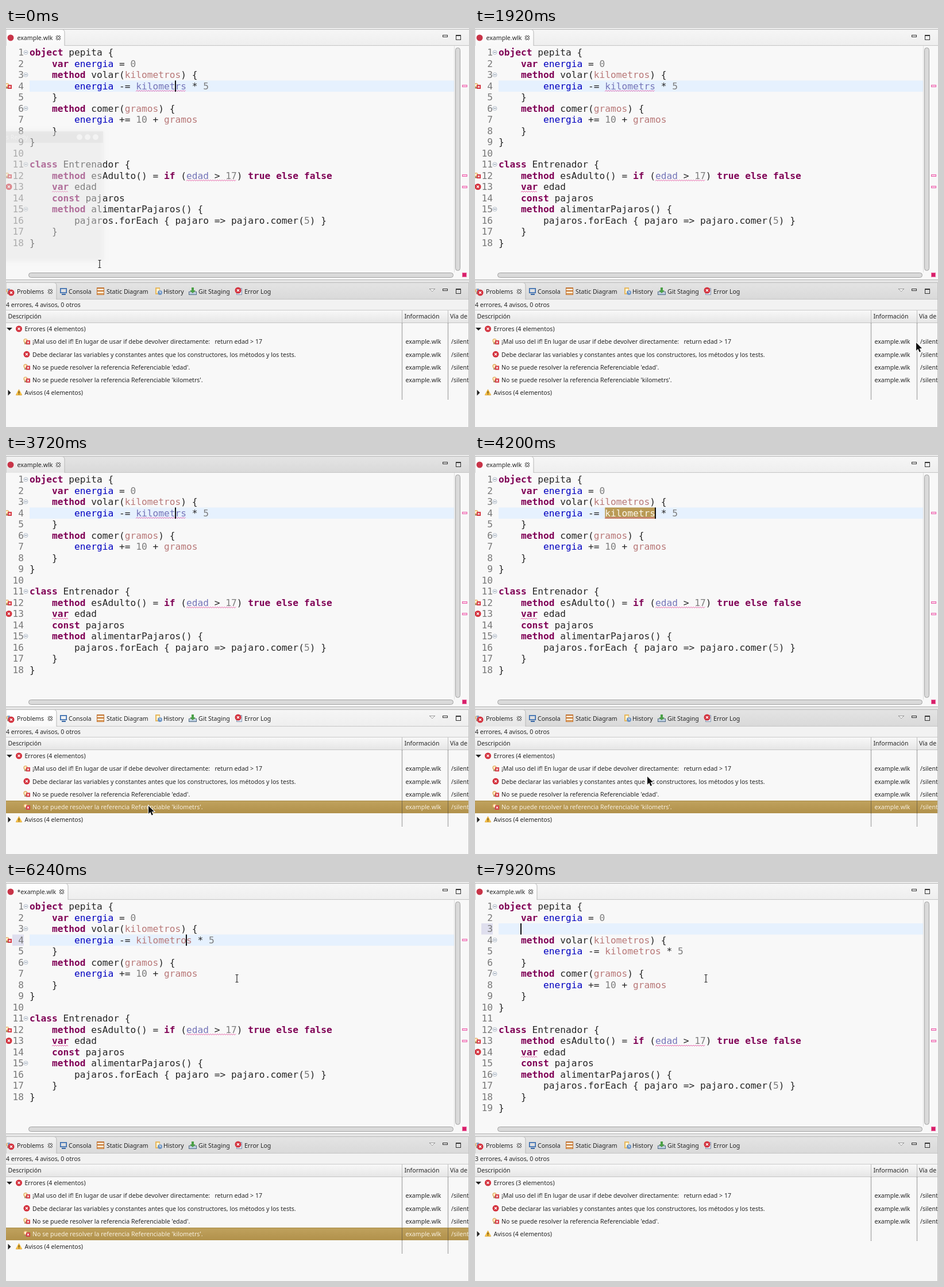
Write an HTML page with a canvas that moves like this. It is 806 px wide and 695 px high and loops after 8 s.

```html
<!DOCTYPE html>
<html lang="es">
<head>
<meta charset="utf-8">
<title>Editor</title>
<style>
html, body { margin: 0; width: 806px; height: 695px; overflow: hidden; background: #f8f8f8; }
canvas { display: block; }
</style>
</head>
<body>
<canvas id="stage" width="806" height="695"></canvas>
<script>
const g = document.getElementById('stage').getContext('2d');
const LOOP = 8000, LEFT = 41, TOP = 33, LINE = 19.5, CHAR = 9.753;
const UI = '10.57px "Noto Sans", sans-serif';
const MONO = '16.2px "DejaVu Sans Mono", monospace';
const RED = '#d3303c', INK = '#252525';

const CODE = `object pepita {
    var energia = 0
    method volar(kilometros) {
        energia -= kilometrs * 5
    }
    method comer(gramos) {
        energia += 10 + gramos
    }
}

class Entrenador {
    method esAdulto() = if (edad > 17) true else false
    var edad
    const pajaros
    method alimentarPajaros() {
        pajaros.forEach { pajaro => pajaro.comer(5) }
    }
}`;

// time, x, y of the pointer
const POINTER = [
  [0, 163, 411], [480, 420, 430], [600, 719, 560], [720, 480, 600], [840, 187, 617],
  [1560, 70, 575], [1680, 2, 548], [1800, 330, 546], [1920, 768, 548], [2040, 560, 552],
  [2160, 230, 566], [2280, 80, 570], [2400, 300, 568], [2520, 738, 568], [2640, 420, 572],
  [2760, 59, 572], [2880, 130, 596], [3000, 150, 633], [3120, 240, 619], [3240, 245, 614],
  [3360, 248, 611], [4200, 300, 560], [4320, 420, 400], [4440, 492, 220], [4560, 380, 71],
  [4680, 71, 110], [4800, 220, 100], [4920, 318, 104], [5040, 314, 105], [5160, 310, 105],
  [5280, 308, 104], [5640, 350, 130], [5760, 402, 168]
];

// time, line, column, visible
const CARET = [
  [0, 4, 26, 1], [600, 4, 26, 0], [1080, 4, 26, 1], [1560, 4, 26, 0], [2160, 4, 26, 1],
  [2640, 4, 26, 0], [3240, 4, 26, 1], [3960, 4, 28, 1], [4560, 4, 28, 0], [5040, 4, 28, 1],
  [5520, 4, 27, 1], [6120, 4, 28, 1], [6840, 4, 28, 0], [7200, 3, 28, 1], [7440, 2, 19, 1],
  [7800, 3, 4, 1]
];

const at = (keys, t) => keys.filter(k => k[0] <= t).pop();
const lineTop = n => TOP + (n - 1) * LINE;
const colX = c => LEFT + c * CHAR;

function box(x, y, w, h, fill) { g.fillStyle = fill; g.fillRect(x, y, w, h); }

function frame(x, y, w, h, stroke) {
  g.strokeStyle = stroke;
  g.lineWidth = 1;
  g.strokeRect(x + .5, y + .5, w - 1, h - 1);
}

function text(s, x, y, color = INK, font = UI) {
  g.font = font;
  g.fillStyle = color;
  g.fillText(s, x, y);
}

function path(points, fill, stroke, width = 1, close = true) {
  g.beginPath();
  points.forEach(([x, y]) => g.lineTo(x, y));
  if (close) g.closePath();
  if (stroke) { g.strokeStyle = stroke; g.lineWidth = width; g.stroke(); }
  if (fill) { g.fillStyle = fill; g.fill(); }
}

function disc(x, y, r, fill) {
  g.beginPath();
  g.arc(x, y, r, 0, 7);
  g.fillStyle = fill;
  g.fill();
}

function fade(y, h, from, to) {
  const f = g.createLinearGradient(0, y, 0, y + h);
  f.addColorStop(0, from);
  f.addColorStop(1, to);
  return f;
}

function cross(x, y, r, color, width = 1.3) {
  path([[x - r, y - r], [x + r, y + r]], null, color, width, false);
  path([[x + r, y - r], [x - r, y + r]], null, color, width, false);
}

function errorIcon(x, y) {
  disc(x, y, 5.5, RED);
  cross(x, y, 2, '#fff');
}

function fixIcon(x, y) {
  disc(x - 2, y - 1.5, 3.6, '#e3ac63');
  disc(x - 2, y - 1.5, 2.3, '#fff0c8');
  box(x - 4, y + 2, 4, 2.5, '#a98960');
  box(x - 1, y - 2, 7, 7, RED);
  cross(x + 2.5, y + 1.5, 1.7, '#fff', 1.1);
}

function warningIcon(x, y) {
  path([[x, y - 5], [x + 5, y + 4.5], [x - 5, y + 4.5]], '#f5c044', '#d99a28');
  box(x - .7, y - 2, 1.5, 3.5, '#513b10');
  box(x - .7, y + 2.2, 1.5, 1.3, '#513b10');
}

function closeIcon(x, y) {
  cross(x, y, 3.2, '#444', 3.6);
  cross(x, y, 3, '#f8f8f8', 1.6);
}

function squiggle(from, to, line) {
  const y = lineTop(line) + 18, points = [];
  for (let x = colX(from), i = 0; x <= colX(to); x += 2, i++) points.push([x, y + (i % 2 ? -1 : 1)]);
  path(points, null, '#e65aa4', 1, false);
}

function thumb(x, y, w, h) {
  g.beginPath();
  g.roundRect(x + .5, y + .5, w - 1, h - 1, 4);
  g.fillStyle = '#dadada';
  g.fill();
  g.strokeStyle = '#a2a2a2';
  g.lineWidth = 1;
  g.stroke();
}

function tab(right, top, bottom, active) {
  g.beginPath();
  g.moveTo(0, bottom);
  g.lineTo(0, top + .5);
  g.lineTo(right - 5, top + .5);
  g.quadraticCurveTo(right, top + .5, right, top + 6);
  g.lineTo(right, bottom);
  g.fillStyle = active ? fade(top, bottom - top, '#ffffff', '#f8f8f8') : fade(top, bottom - top, '#f3f3f3', '#e5e5e5');
  g.fill();
  g.strokeStyle = '#b7b7b7';
  g.lineWidth = 1;
  g.stroke();
}

function windowButtons(y) {
  frame(760, y, 9, 4, '#333');
  frame(783, y, 9, 9, '#333');
  box(783, y, 9, 2, '#333');
}

function bar(top, h, active) {
  box(0, top, 806, h, active ? fade(top, h, '#f6f6f6', '#eeeeee') : fade(top, h, '#e4e4e4', '#d9d9d9'));
  box(0, top, 806, 1, '#b7b7b7');
  box(0, top + h - 1, 806, 1, '#c5c5c5');
}

function codeLine(src, n) {
  const y = lineTop(n) + 15.2;
  const token = /\b(object|var|method|class|const|if|true|else|false)\b|\b(energia)\b|\b(kilometros|gramos)\b|\b(kilometrs)\b|\b(\d+)\b|[^\s\w]+|\w+/g;
  for (const m of src.matchAll(token)) {
    const [s, keyword, field, param, unknown, number] = m;
    const unresolved = unknown || (s === 'edad' && src.includes('if'));
    const color = keyword ? '#7f0055' : field ? '#0000c0' : param ? '#b87878'
      : unresolved ? '#7474b8' : number ? '#7d7d7d' : INK;
    text(s, colX(m.index), y, color, (keyword ? 'bold ' : '') + MONO);
  }
}

function editor(s) {
  bar(2, 29, s.editorActive);
  const shift = s.dirty ? 6 : 0;
  tab(102 + shift, 2, 31, s.editorActive);
  disc(8, 17, 5.5, '#c83448');
  text((s.dirty ? '*' : '') + 'example.wlk', 19.5, 21);
  closeIcon(91 + shift, 17);
  windowButtons(12);
  box(0, 31, 806, 407, '#f8f8f8');

  const lines = CODE.split('\n');
  if (s.typed) lines[3] = lines[3].replace('kilometrs', 'kilometros');
  if (s.inserted) lines.splice(2, 0, '');
  const [, caretLine, caretCol, caretOn] = s.caret;
  const mark = lineTop(caretLine);
  box(LEFT, mark, 739, LINE, '#e6f1fe');
  if (s.dirty) box(11, mark, 20, LINE, '#dfdfee');

  lines.forEach((src, i) => {
    const n = i + 1, mid = lineTop(n) + 9.5;
    g.textAlign = 'right';
    text(n, 31, lineTop(n) + 15.2, '#787878', MONO);
    g.textAlign = 'left';
    if (/^(object|class)|method (volar|comer|alim)/.test(src.trim())) {
      g.beginPath();
      g.arc(34.5, mid, 3.5, 0, 7);
      g.strokeStyle = '#b0bccb';
      g.lineWidth = 1;
      g.stroke();
      box(32.5, mid - .5, 4, 1, '#6f8299');
    }
    codeLine(src, n);
    if (src.includes('kilometrs')) squiggle(19, 28, n);
    if (src.includes(' if ')) { squiggle(28, 37, n); fixIcon(4, mid); }
    if (src.endsWith('var edad')) { squiggle(4, 7, n); errorIcon(5, mid); }
  });

  if (s.selected) {
    box(colX(19), lineTop(4), 9 * CHAR, LINE, '#b99a55');
    text('kilometrs', colX(19), lineTop(4) + 15.2, '#faf6ec', MONO);
    squiggle(19, 28, 4);
  }
  if (!s.saved) fixIcon(4, lineTop(4) + 9.5);
  if (s.bracket) frame(Math.round(colX(16)), lineTop(3) + 1, 10, 18, '#b8b8b8');
  if (caretOn) box(Math.round(colX(caretCol)) - 1, mark, 2, LINE, '#111');

  box(780, 31, 1, 395, '#dedede');
  thumb(782, 34, 9, 389);
  thumb(39, 426, 740, 9);
  for (const y of s.saved ? [257, 277] : [101, 257, 277]) {
    box(794, y - 2, 9, 4, '#ffd2e9');
    frame(794, y - 2, 9, 4, '#e960ab');
  }
  box(794, 426, 8, 8, '#d61f69');
  frame(794, 426, 8, 8, '#f06da4');
  box(0, 438, 806, 1, '#b5b5b5');
  box(0, 439, 806, 4, '#e6e6e6');
}

function tabIcons() {
  fixIcon(6, 459);
  box(3, 454, 4, 9, '#7f9fca');
  errorIcon(9, 461);

  frame(94, 453, 12, 9, '#3465a4');
  frame(95, 454, 10, 7, '#6b95cb');
  box(97, 463, 7, 2, '#3465a4');

  box(158, 452, 13, 13, '#c06f2d');
  for (const y of [454, 459]) box(159, y, 11, 3, '#fff0d5');
  box(159, 463, 11, 1, '#f3c78e');

  box(260, 452, 8, 12, '#e6b75d');
  box(262, 454, 5, 8, '#fff4d2');
  disc(268, 461, 4, '#6f96c5');
  path([[268, 458], [268, 461], [270, 461]], null, '#fff', 1, false);

  frame(318, 459, 14, 6, '#506b86');
  box(319, 461, 12, 3, '#b8cade');
  path([[323, 452], [327, 452], [327, 457], [330, 457], [325, 462], [320, 457], [323, 457]], '#4ba047');

  box(401, 453, 10, 12, '#dce5f1');
  frame(401, 453, 10, 12, '#8799b2');
  errorIcon(404, 457);
}

function problems(s) {
  bar(443, 30, !s.editorActive);
  tab(88, 443, 473, !s.editorActive);
  tabIcons();
  [['Problems', 19], ['Consola', 109], ['Static Diagram', 175], ['History', 274], ['Git Staging', 335], ['Error Log', 415]]
    .forEach(([label, x]) => text(label, x, 463));
  closeIcon(77, 459);
  path([[737.5, 454.5], [746.5, 454.5], [742, 459]], '#fff', '#333');
  windowButtons(454);

  const count = s.listUpdated ? 3 : 4;
  box(0, 473, 806, 222, '#f8f8f8');
  box(0, 473, 806, 19, '#f2f2f2');
  text(`${count} errores, 4 avisos, 0 otros`, 0, 486);
  box(0, 492, 806, 21, fade(492, 21, '#f8f8f8', '#e6e6e6'));
  box(0, 491, 806, 1, '#c9c9c9');
  box(0, 513, 806, 1, '#c5c5c5');
  [['Descripción', 3.5], ['Información', 693.5], ['Vía de', 773]].forEach(([label, x]) => text(label, x, 506));
  for (const x of [689, 769]) box(x, 492, 1, 21, '#bdbdbd');

  const mid = i => 524.5 + i * 22.15;
  path([[1, 522], [11, 522], [6, 527]], '#222');
  errorIcon(22.5, mid(0) - .5);
  text(`Errores (${count} elementos)`, 32.5, mid(0) + 3.7);
  const rows = [
    '¡Mal uso del if! En lugar de usar if debe devolver directamente:   return edad > 17',
    'Debe declarar las variables y constantes antes que los constructores, los métodos y los tests.',
    "No se puede resolver la referencia Referenciable 'edad'.",
    "No se puede resolver la referencia Referenciable 'kilometrs'."
  ].slice(0, count);
  rows.forEach((label, i) => {
    const y = mid(i + 1), chosen = i === 3 && s.rowSelected;
    if (chosen) {
      box(0, 602, 806, 22, fade(602, 22, '#c0a25e', '#b1914b'));
      box(0, 602, 806, 1, '#a98c48');
    }
    const color = chosen ? '#f8f0df' : INK;
    (i === 1 ? errorIcon : fixIcon)(36, y - .5);
    text(label, 46, y + 3.7, color);
    text('example.wlk', 695.5, y + 3.7, color);
    text('/silent', 775, y + 3.7, color);
  });
  const last = mid(count + 1);
  path([[3.5, last - 5], [8.5, last], [3.5, last + 5]], '#222');
  warningIcon(22.5, last - .5);
  text('Avisos (4 elementos)', 32.5, last + 3.7);
  for (const x of [689, 769])
    for (let y = 514; y < last + 12; y += 2) box(x, y, 1, 1, '#333');
  box(805, 443, 1, 252, '#c4c4c4');
}

function ghostWindow() {
  g.save();
  g.shadowColor = 'rgba(0,0,0,.10)';
  g.shadowBlur = 7;
  box(-4, 180, 173, 225, 'rgba(242,242,242,.45)');
  g.restore();
  box(0, 180, 169, 20, 'rgba(90,90,90,.06)');
  for (const x of [128, 142, 156]) disc(x, 190, 5, 'rgba(255,255,255,.5)');
  text('s Ready', 0, 194, 'rgba(255,255,255,.5)');
}

function pointer([, x, y]) {
  if (y < 425 && x < 780) {
    const stem = [[x - 2.5, y - 6.5], [x + 2.5, y - 6.5], [x, y - 6.5], [x, y + 6.5], [x - 2.5, y + 6.5], [x + 2.5, y + 6.5]];
    path(stem, null, '#fff', 3, false);
    path(stem, null, '#222', 1.2, false);
    return;
  }
  const shape = [[0, 0], [0, 14], [3.2, 11], [5.6, 16.5], [8, 15.5], [5.6, 10.2], [10, 10]];
  path(shape.map(([dx, dy]) => [x + dx, y + dy]), '#111', '#fff', 2);
}

function draw(t) {
  const between = (a, b) => t >= a && t < b;
  const state = {
    caret: at(CARET, t),
    editorActive: !between(3600, 3960),
    rowSelected: t >= 3600,
    selected: between(3960, 5520),
    typed: t >= 6120,
    saved: t >= 6720,
    dirty: between(6120, 6720) || t >= 7800,
    bracket: between(7200, 7440),
    listUpdated: t >= 7440,
    inserted: t >= 7800
  };
  box(0, 0, 806, 695, '#ededed');
  editor(state);
  problems(state);
  if (t < 120) ghostWindow();
  pointer(at(POINTER, t));
}

function tick(now) {
  draw(now % LOOP);
  requestAnimationFrame(tick);
}
requestAnimationFrame(tick);
</script>
</body>
</html>
```
